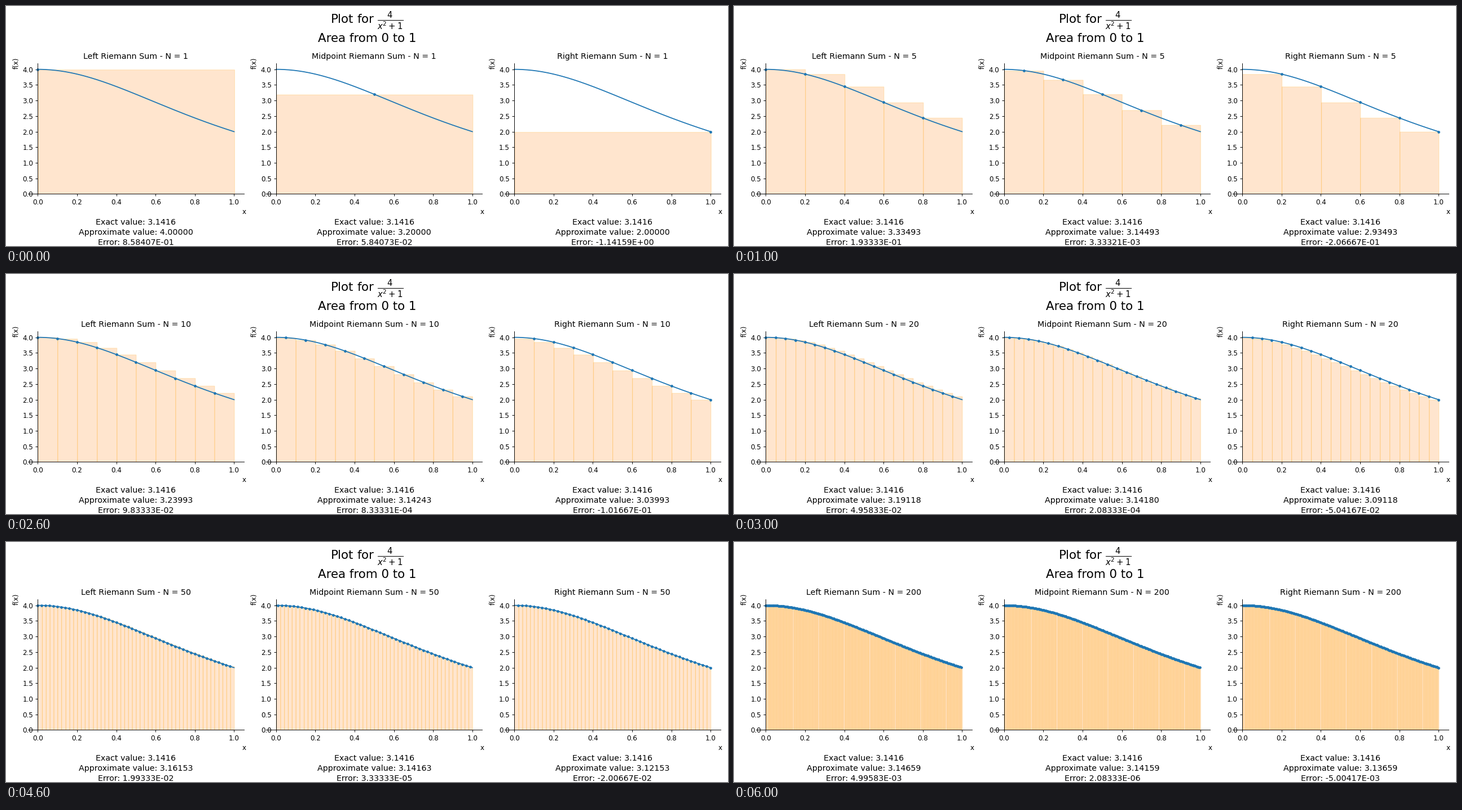
These frames come from a looping animation (1280x427 px, 7000 ms). A matplotlib script:

```python
import math

import matplotlib.pyplot as plt
import numpy as np
from matplotlib.animation import FuncAnimation
from matplotlib.collections import PolyCollection

W, H = 1280, 427
DPI = 256 / 3
COUNTS = [1, 5, 10, 20, 50, 100, 200]
RULES = [("Left", 0.0), ("Midpoint", 0.5), ("Right", 1.0)]

# Bars sit on a fine grid of GW x GH cells laid over the figure.
GW, GH = 1500, 500
ORIGIN_X, UNIT_X, STEP_X = 66.43, 407.7, 495
ORIGIN_Y, UNIT_Y = 391.7, 64.9


def f(x):
    return 4 / (x**2 + 1)


def snap(v):
    return np.floor(v + 0.5) + 0.5


def bar_shapes(panel, n, heights):
    edges = np.arange(n + 1) / n
    xs = snap(ORIGIN_X + panel * STEP_X + UNIT_X * edges) / GW
    tops = 1 - snap(ORIGIN_Y - UNIT_Y * heights) / GH
    base = 1 - snap(ORIGIN_Y) / GH
    return [[(a, base), (b, base), (b, t), (a, t)]
            for a, b, t in zip(xs[:-1], xs[1:], tops)]


def put_text(x, y, text, size):
    """Centred text with its baseline y pixels below the top."""
    return fig.text(x / W, 1 - y / H, text, size=size,
                    ha="center", va="baseline")


class Panel:
    def __init__(self, index, name, offset):
        self.index, self.name, self.offset = index, name, offset
        unit = UNIT_X * W / GW
        left = (ORIGIN_X + index * STEP_X) * W / GW - 0.05 * unit - 0.2
        width, bottom, top = 1.1 * unit, 334.4, 101.6

        ax = fig.add_axes([left / W, 1 - bottom / H,
                           width / W, (bottom - top) / H])
        ax.set(xlim=(-0.05, 1.05), ylim=(0, 4.2),
               xticks=np.arange(6) / 5, yticks=np.arange(9) / 2)
        ax.spines[["top", "right"]].set_visible(False)
        ax.spines["left"].set_position("zero")
        ax.set_xlabel("x", x=1.0)
        ax.set_ylabel("f(x)", y=1.0)

        self.bars = PolyCollection(
            [], facecolor="#ff7f0e", edgecolor="orange", alpha=0.2,
            linewidth=1, joinstyle="miter", snap=False,
            transform=fig.transFigure, zorder=1)
        ax.add_collection(self.bars, autolim=False)
        xs = np.linspace(0, 1, 200)
        ax.plot(xs, f(xs), color="C0", lw=1.5)
        self.dots, = ax.plot([], [], ".", color="C0")

        self.title = ax.set_title("", pad=6)
        mid = left + width / 2
        put_text(mid, 389, f"Exact value: {math.pi:.4f}", 12)
        self.approx = put_text(mid, 407, "", 12)
        self.error = put_text(mid, 425, "", 12)

    def show(self, n):
        xs = (np.arange(n) + self.offset) / n
        ys = f(xs)
        area = ys.sum() / n
        self.bars.set_verts(bar_shapes(self.index, n, ys))
        self.dots.set_data(xs, ys)
        self.title.set_text(f"{self.name} Riemann Sum - N = {n}")
        self.approx.set_text(f"Approximate value: {area:.5f}")
        self.error.set_text(f"Error: {area - math.pi:.5E}")


fig = plt.figure(figsize=(W * 3 / 256, H * 3 / 256), dpi=DPI,
                 facecolor="white")
put_text(W / 2, 31, r"Plot for $\frac{4}{x^{2} + 1}$", 18)
put_text(W / 2, 64, "Area from 0 to 1", 18)
panels = [Panel(i, *rule) for i, rule in enumerate(RULES)]


def update(i):
    for panel in panels:
        panel.show(COUNTS[i])
    return []


anim = FuncAnimation(fig, update, frames=len(COUNTS), interval=1000,
                     init_func=lambda: update(0), repeat=True,
                     repeat_delay=0, blit=False)
plt.show()
```
